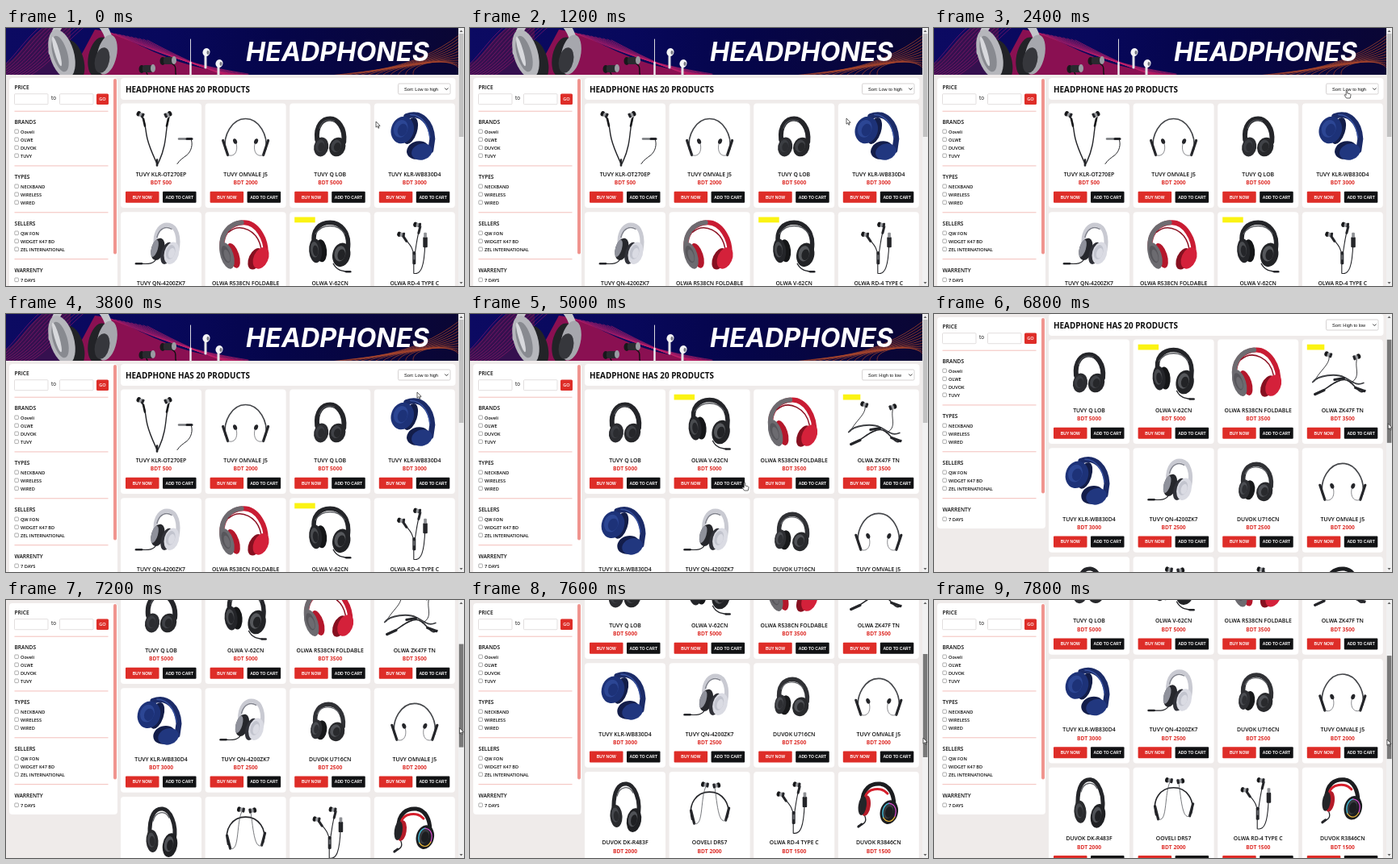
Write an HTML page that moves like this. It is 567x320 px and loops after 8 s.

```html
<!DOCTYPE html>
<html lang="en">
<head>
<meta charset="utf-8">
<title>Headphone shop</title>
<style>
html, body { margin: 0; width: 100%; height: 100%; overflow: hidden; background: #efebea; }
svg { display: block; width: 100vw; height: 100vh; }
text { font-family: "Open Sans", "Noto Sans", sans-serif; font-weight: 600; fill: #0c0c0c; }
.ui { font-family: "Liberation Sans", Arial, sans-serif; font-weight: 400; }
.button { font-weight: 700; fill: #fff; }
.hero { font: italic 700 32.3px Inter, sans-serif; fill: #fff; }
</style>
</head>
<body>
<svg id="stage" viewBox="0 0 567 320" preserveAspectRatio="none"></svg>
<script>
const RED = '#de2d28', INK = '#242529', GREY = '#55575c';
const LOOP = 8000, STEP = 200;

const rect = (x, y, w, h, fill, r = 0, extra = '') =>
  `<rect x="${x}" y="${y}" width="${w}" height="${h}" rx="${r}" fill="${fill}" ${extra}/>`;
const oval = (x, y, rx, ry, fill, turn = 0) =>
  `<ellipse cx="${x}" cy="${y}" rx="${rx}" ry="${ry}" fill="${fill}" transform="rotate(${turn} ${x} ${y})"/>`;
const line = (d, color = INK, w = 1) =>
  `<path d="${d}" fill="none" stroke="${color}" stroke-width="${w}" stroke-linecap="round" stroke-linejoin="round"/>`;
const shape = (d, fill) => `<path d="${d}" fill="${fill}"/>`;
const text = (x, y, size, str, extra = '') =>
  `<text x="${x}" y="${y}" font-size="${size}" ${extra}>${str}</text>`;
const group = (inner, extra = '') => `<g ${extra}>${inner}</g>`;
const mid = 'text-anchor="middle"';

const cup = (x, y, rx, ry, color, shine, turn) =>
  oval(x, y, rx, ry, color, turn) +
  oval(x - rx * .15, y - ry * .1, rx * .62, ry * .65, shine, turn) +
  oval(x, y, rx * .42, ry * .46, color, turn);
const bud = (x, y, turn) => group(
  oval(-3, 0, 2.6, 3.2, '#17181a') + rect(-2, -2.6, 6, 5.2, '#96989c', 1.5) +
  rect(1, -3, 3, 6, INK, 1), `transform="translate(${x} ${y}) rotate(${turn})"`);
const badge = w => rect(6, 6.2, w, 6.8, '#fbf313');

// Product drawings, in the coordinates of a 100 px wide card
const art = {
  wired: () =>
    line('M26 17C31 21 30 32 33 44S41 66 45 75M60 17C56 28 57 38 54 52S49 68 46 75', INK, 1.4) +
    line('M28 19l2 9M59 19l-2 9', '#17181a', 2.6) + bud(25, 14, 25) + bud(58, 14, 155) +
    line('M45 70V77', INK, 2.6) + line('M72 44h14M87 44C90 51 87 60 82 64S73 70 70 75', INK, 1) +
    line('M72 44h9', '#77797d', 2.4) + line('M82 44h6', INK, 3),
  loop: () =>
    line('M25 57C22 40 33 19 50 19S78 40 75 57', '#45474b', 1.7) +
    line('M22 46L28 64M78 46L72 64', INK, 3.2) +
    line('M28 64C38 68 42 56 37 46M72 64C62 68 58 56 63 46', GREY, .7) +
    oval(37, 47, 2.4, 3.4, INK, -20) + oval(63, 47, 2.4, 3.4, INK, 20),
  over: () =>
    line('M34 45C32 27 41 19 50 19S69 30 67 48', INK, 6) +
    line('M37 31C40 21 47 19 55 22', '#4b4d52', 1.5) +
    cup(39, 54, 9, 12, '#2b2c30', '#3b3d42', 10) + cup(59, 54, 10, 12, '#26272a', '#404247', 18),
  blue: () =>
    line('M40 16C58 9 71 24 72 44L70 58', '#1b2b68', 7) +
    line('M45 14C59 14 67 27 69 42', '#38529f', 1.5) +
    oval(45, 34, 8, 17, '#131d48', 18) + cup(35, 33, 14, 17, '#1d3278', '#2c4694', 18) +
    oval(54, 58, 14, 11, '#131d4a', -18) + oval(59, 60, 13, 10, '#21377f', -18),
  white: () =>
    line('M43 40C42 22 51 14 60 16S73 31 70 47', '#c9cad2', 5) +
    line('M45 31C48 20 56 17 63 21', '#7f818b', 1.4) +
    oval(46, 46, 8, 14, '#26272c', 16) + oval(42, 45, 4, 11, '#8f919b', 16) +
    oval(57, 51, 7, 14, '#303138', 16) + cup(63, 51, 9, 14, '#dadbe3', '#c2c4ce', 16) +
    line('M44 58C40 66 32 64 21 64', INK, 1.2) + line('M19 64h7', INK, 2.6),
  red: () =>
    line('M21 46C19 25 33 13 48 13S77 32 75 56', '#c91c33', 6) +
    line('M21 48C18 27 30 14 45 13', '#6e6b70', 6) +
    line('M29 25C44 12 65 24 69 44', '#8c1223', 1.5) +
    oval(35, 54, 7, 16, '#b4172b', -18) + cup(27, 54, 8, 17, '#6c6b70', '#57565b', -18) +
    oval(62, 58, 8, 14, '#861020', 24) + oval(69, 57, 9, 14, '#d4213a', 24),
  gamer: w => badge(w || 25.5) +
    line('M31 42C26 21 38 13 50 13S75 24 72 46', INK, 5.5) +
    line('M32 27C40 14 60 14 68 27', GREY, 1.5) +
    oval(39, 48, 7, 14, '#151618', -5) + cup(32, 48, 8, 15, INK, '#4a4c50', -5) +
    cup(64, 53, 11, 15, '#222326', '#56585c', 12) +
    line('M54 64C58 72 64 73 71 74', INK, 1.4) + line('M70 74h5', INK, 2.6),
  typeC: () =>
    line('M36 30C42 39 48 42 49 54V76M57 18C53 30 52 43 50 54M49 76C58 78 62 68 63 39', INK, 1.1) +
    line('M36 30l4 6M57 18l-2 8', INK, 3) + bud(34, 28, 10) + bud(54, 16, 10) +
    rect(47.5, 49, 4, 16, INK, 1.5) + rect(48.5, 53, 2, 6, '#696b70') +
    rect(60.5, 31, 5.5, 13, INK, 1.2) + rect(61.4, 25.5, 3.7, 6, '#8f9195', 1),
  band: () => badge(21.5) +
    line('M33 20C36 30 22 38 15 52M68 23C64 36 74 46 60 54', INK, .9) +
    line('M18 67C30 63 40 50 52 50S70 72 78 63', INK, 1.5) +
    line('M13 53C20 44 42 42 52 47S66 58 76 54', '#3d3f43', 1.8) +
    line('M16 68l11-5M66 60l11 4', INK, 3.4) + line('M40 50l12-2', INK, 3) +
    bud(33, 19, 20) + bud(67, 22, 160),
  soft: () =>
    line('M32 47C29 28 38 20 48 20S68 31 66 48', '#303135', 5.5) +
    line('M34 32C39 21 54 21 61 31', '#66686d', 1.2) +
    oval(39, 52, 7, 12, '#18191b', 8) + cup(33, 51, 7, 12, '#2e2f33', '#4d4f54', 8) +
    cup(58, 54, 10, 12, '#292a2d', '#515358', 16),
  tall: () =>
    line('M36 48C35 22 43 14 52 15S70 34 66 54', INK, 5) +
    line('M40 30C43 18 55 16 60 26', '#606267', 1.4) +
    cup(39, 55, 7.5, 14, '#292a2d', '#46484d', -4) + cup(61, 60, 9, 15, '#1f2023', '#505257', 10),
  clip: () =>
    line('M28 59C23 39 34 25 50 25S77 40 72 57', INK, 1.6) +
    line('M27 48L31 64M74 45L70 60', INK, 3.2) +
    line('M31 64C43 70 38 31 46 17M70 60C60 67 59 32 56 17', GREY, .8) +
    bud(45, 16, 10) + bud(58, 17, 170),
  glow: () =>
    line('M30 41C29 20 41 14 52 15S70 28 69 45', '#1c1d20', 5) +
    line('M33 32C36 20 53 18 61 27', '#d51f2c', 3) +
    oval(34, 42, 6, 13, '#b51b29', 8) + oval(30, 42, 5, 12, INK, 8) +
    cup(63, 50, 11, 15, '#1c1d20', '#37393e', 14) +
    line('M56 57C53 47 58 40 63 39', '#3dc8e8', 1.2) + line('M63 39C71 40 73 48 70 56', '#d94cd0', 1.2) +
    line('M70 56C66 63 60 63 56 57', '#e8b63a', 1.2) +
    line('M33 55C36 62 32 65 25 67', INK, 1.3) + line('M25 68l4-3', INK, 3)
};

const goods = {
  wired: ['TUVY KLR-OT270EP', 500], loop: ['TUVY OMVALE J5', 2000], over: ['TUVY Q LOB', 5000],
  blue: ['TUVY KLR-WB830D4', 3000], white: ['TUVY QN-4200ZK7', 2500],
  red: ['OLWA R538CN FOLDABLE', 3500], gamer: ['OLWA V-62CN', 5000], typeC: ['OLWA RD-4 TYPE C', 1500],
  band: ['OLWA ZK47F TN', 3500], soft: ['DUVOK U716CN', 2500], tall: ['DUVOK DK-R483F', 2000],
  clip: ['OOVELI DR57', 2000], glow: ['DUVOK R3846CN', 1500]
};
const rising = 'wired loop over blue white red gamer typeC'.split(' ');
const falling = 'over gamer red band blue white soft loop tall clip typeC glow'.split(' ');

function card(key, i) {
  const [name, price] = goods[key];
  const x = 142 + (i % 4) * 104.6, y = 93.5 + Math.floor(i / 4) * 134.8;
  const button = (bx, color, label) => rect(bx, 109.3, 41.5, 14, color, 1) +
    text(bx + 20.8, 118.1, 5, label, `class="ui button" ${mid}`);
  return group(
    rect(0, 0, 100, 129.5, '#fff', 4) + art[key]() +
    text(50, 90.3, 6.85, name, mid) +
    text(50, 100.9, 6.7, 'BDT ' + price, `${mid} style="font-weight:700;fill:${RED}"`) +
    button(6, RED, 'BUY NOW') + button(52, '#111214', 'ADD TO CART'),
    `transform="translate(${x} ${y})"`);
}

function banner() {
  let waves = '';
  for (let i = 0; i < 12; i++) {
    const k = i * 5;
    waves += line(`M${-30 + k} 62C${5 + k} ${52 - i} ${15 + k} 20 ${45 + k} -4`, '#9c1a70', .6);
    waves += line(`M${120 + k} ${4 + i}C${160 + k} ${14 + i * 2} ${190 + k} ${40 + i} 300 ${57 + i}`, '#c2206a', .6);
    waves += line(`M${395 + k * 2} 60C${440 + k} ${53 - i} ${500 + k} ${56 - k * .4} 562 ${8 + i * 4}`, '#b24a2c', .7);
  }
  const pod = (x, y, stem) => line(`M${x - 1} ${y + 3}v${stem}`, '#e4e4e8', 3) +
    oval(x, y, 4.5, 5, '#f4f4f6', 20) + oval(x + 2, y + .5, 1.5, 2.4, '#777984');
  const plug = (x, y) => oval(x - 8, y + 1, 3.5, 5, '#17181b') + rect(x - 7, y - 4, 13, 9, '#292a2f', 3) +
    oval(x + 6, y, 3, 5, '#9a9ca3');
  return group(rect(0, 0, 560, 58, 'url(#sky)') +
    shape('M110 2C160 8 190 50 300 58H80Z', '#8a1052') +
    shape('M0 44C16 36 24 14 46 0H80V58H0Z', '#35104f') + waves +
    line('M57 30C58 10 62 0 70 -8M131 30C128 8 122 -2 112 -10', '#c4c5ca', 9) +
    oval(83, 40, 13, 26, '#222327', -16) + oval(69, 32, 15, 31, '#b6b7bc', -16) +
    oval(67, 32, 9, 23, '#888a90', -16) + oval(63, 29, 3, 19, '#d8d9dd', -16) +
    oval(115, 36, 13, 25, '#222327', 12) + oval(125, 33, 12, 25, '#a6a7ad', 12) +
    oval(119, 40, 9, 16, '#36373c', 12) +
    line('M174 54C173 56 176 57 175 60M205 44C213 47 208 54 211 60', '#111', 1.4) +
    plug(176, 50) + plug(202, 40) +
    line('M228.5 14V58', '#d9d9df', 1) + line('M228.5 43V60', '#efeff2', 2.4) +
    pod(248, 30, 16) + pod(264, 44, 16) +
    '<text class="hero" x="297" y="41">HEADPHONES</text>', 'clip-path="url(#top)"');
}

function sidebar() {
  const rule = y => rect(10.5, y, 116, .7, '#eea49d');
  const field = x => rect(x, 81.7, 41.5, 13, '#fff', 1, 'stroke="#d6d2d2" stroke-width=".7"');
  const list = (title, y, items) => text(10.5, y, 6.6, title) + items.map((s, i) => {
    const cy = y + 10 + i * 10;
    return rect(10.8, cy - 2.5, 4.6, 4.6, '#fff', .8, 'stroke="#777" stroke-width=".6"') +
      text(18, cy + 2, 5.6, s);
  }).join('');
  return rect(4, 62, 134, 262, '#fff', 4) + rect(133, 63, 4, 217.5, '#f0958f', 2) +
    text(10.5, 75.6, 6.6, 'PRICE') + field(10.5) + text(56, 89, 6.4, 'to', 'style="font-weight:400"') +
    field(66.5) + rect(112, 81.5, 15, 13.4, RED, 1.5) +
    text(119.5, 90.3, 5.6, 'GO', `${mid} style="fill:#fff"`) +
    rule(102.8) + list('BRANDS', 118.5, ['Ooveli', 'OLWE', 'DUVOK', 'TUVY']) +
    rule(170.6) + list('TYPES', 186.5, ['NECKBAND', 'WIRELESS', 'WIRED']) +
    rule(228.5) + list('SELLERS', 244.5, ['QW FON', 'WIDGET K47 BD', 'ZEL INTERNATIONAL']) +
    rule(286.4) + list('WARRENTY', 302.5, ['7 DAYS']);
}

const heading =
  rect(142, 62, 414.5, 27, '#fff', 4) +
  text(148, 79.6, 9.9, 'HEADPHONE HAS 20 PRODUCTS', 'style="font-weight:700"') +
  rect(485.5, 69, 64.5, 13, '#fff', 1.5, 'stroke="#c4c0c0" stroke-width=".7"') +
  text(493, 77.5, 5.6, '', 'id="sort" class="ui"') + line('M543.5 74.8l1.8 1.8 1.8-1.8', '#222', .9);

const scrollbar = rect(560, 0, 7, 320, '#f1f1f1') +
  shape('M561.5 5l2-2.4 2 2.4z', '#606060') + shape('M561.5 315l2 2.4 2-2.4z', '#606060') +
  rect(560.8, 7, 5.6, 128, '#c1c1c1', 0, 'id="thumb"');

const edge = 'stroke="#222" stroke-width=".7" stroke-linejoin="round"';
const arrow = `<path id="arrow" d="M0 0V7.2L1.7 5.7 2.9 8.3 4 7.8 2.9 5.3H5.1Z" fill="#fff" ${edge}/>`;
const hand = `<path id="hand" d="M-.8 .7Q0 -.5 .8 .7V4L4.2 4.8Q5.2 5.2 4.9 7L4.2 10H-.4L-3 6.4Q-2.6 5.2 -.8 6.3Z" fill="#fff" ${edge}/>`;

const $ = id => document.getElementById(id);
$('stage').innerHTML =
  `<defs><linearGradient id="sky"><stop offset="0" stop-color="#0c0a62"/><stop offset=".35" stop-color="#08085c"/>
  <stop offset=".6" stop-color="#05054a"/><stop offset="1" stop-color="#0a0634"/></linearGradient>
  <clipPath id="top"><rect width="560" height="58"/></clipPath></defs>` +
  rect(0, 0, 567, 320, '#efebea') +
  group(banner() + heading + group(rising.map(card).join(''), 'id="low"') +
    group(falling.map(card).join(''), 'id="high"'), 'id="page"') +
  group(sidebar(), 'id="side"') + scrollbar + group(arrow + hand, 'id="cursor"');

// Keyframes: [time, value, ...]
const pointer = [
  [0, 458, 116], [1200, 466, 112], [1800, 500, 88], [2200, 511, 77], [2800, 511, 77],
  [3400, 509, 97], [4000, 509, 97], [4800, 340, 209], [5200, 340, 209], [6000, 554, 125], [6400, 563, 111]
];
const scrolling = [[6400, 0], [6800, 62], [7200, 119], [7400, 138], [7600, 150], [7800, 155.3]];

function at(keys, t) {
  let i = 0;
  while (i < keys.length - 1 && t >= keys[i + 1][0]) i++;
  const a = keys[i], b = keys[i + 1];
  if (!b || t <= a[0]) return a.slice(1);
  const p = (t - a[0]) / (b[0] - a[0]);
  return a.slice(1).map((v, n) => v + (b[n + 1] - v) * p);
}

const show = (id, on) => $(id).setAttribute('display', on ? 'inline' : 'none');
const move = (id, x, y) => $(id).setAttribute('transform', `translate(${x} ${y})`);

function draw(t) {
  const [scroll] = at(scrolling, t), [x, y] = at(pointer, t);
  const slide = scroll * .4;
  const sorted = t >= 4000;
  const pointing = (t >= 2000 && t < 3000) || (t >= 4800 && t < 5400);
  show('low', !sorted);
  show('high', sorted);
  $('sort').textContent = sorted ? 'Sort: High to low' : 'Sort: Low to high';
  move('page', 0, -scroll);
  move('side', 0, -Math.min(scroll, 58));
  move('thumb', 0, slide);
  $('thumb').setAttribute('fill', t >= 6400 ? '#787878' : t >= 6200 ? '#a8a8a8' : '#c1c1c1');
  show('arrow', !pointing);
  show('hand', pointing);
  move('cursor', x - scroll * .013, y + slide);
}

const start = performance.now();
function tick() {
  const t = (performance.now() - start) % LOOP;
  draw(Math.floor(t / STEP) * STEP);
  requestAnimationFrame(tick);
}
tick();
</script>
</body>
</html>
```
